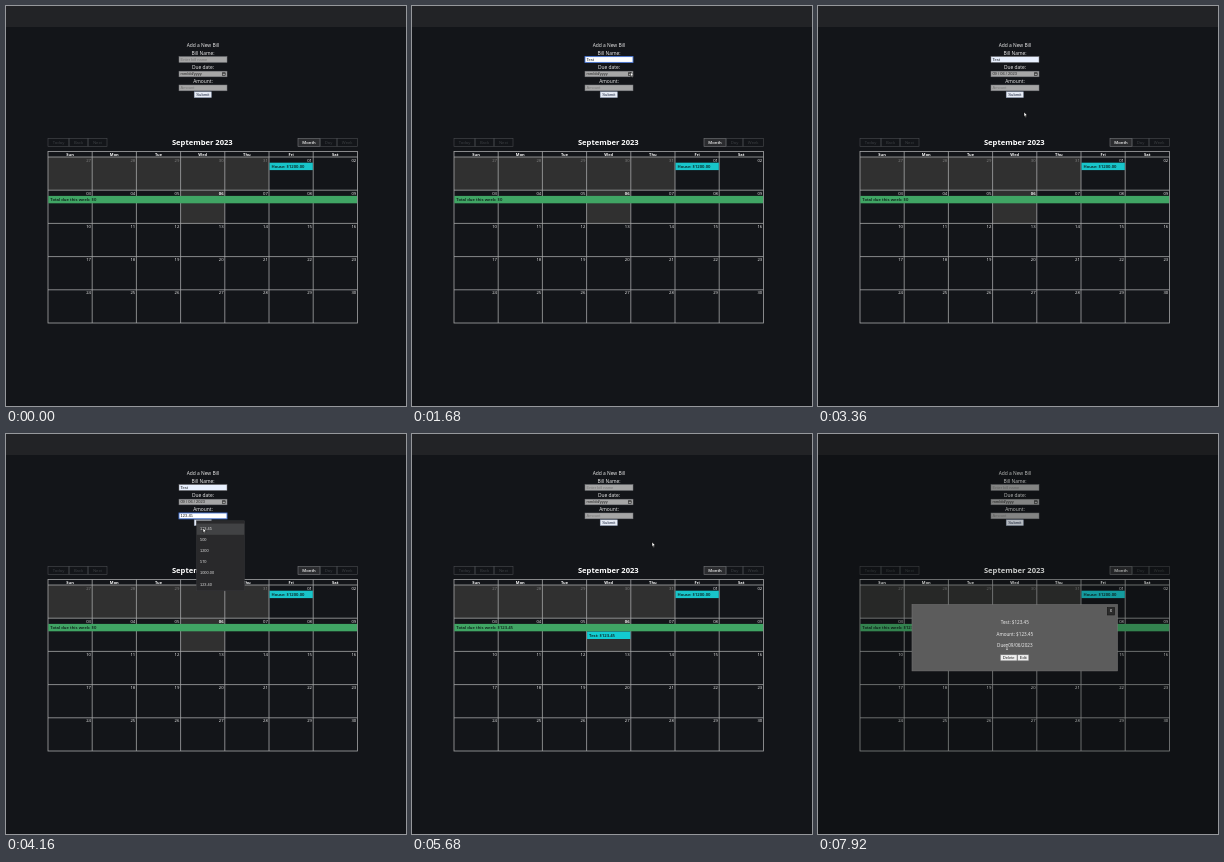
An HTML page with a canvas that plays this animation: 400x400 px, repeating every 8000 ms.

```html
<!DOCTYPE html>
<html lang="en">
<head>
<meta charset="utf-8">
<title>Bill calendar</title>
<style>
html, body { margin: 0; width: 100%; height: 100%; overflow: hidden; background: #131519; }
canvas { display: block; width: 400px; height: 400px; }
</style>
</head>
<body>
<canvas id="stage"></canvas>
<script>
const LOOP = 8000;
const canvas = document.getElementById('stage');
const ctx = canvas.getContext('2d');
const dpr = window.devicePixelRatio || 1;
canvas.width = canvas.height = 400 * dpr;

const UI = '"Open Sans", "Noto Sans", sans-serif';
const ARIAL = '"Liberation Sans", Arial, sans-serif';
const DAYS = ['Sun', 'Mon', 'Tue', 'Wed', 'Thu', 'Fri', 'Sat'];
const NAMES = ['Test', 'Test2', 'Prep', 'House', 'Test3', 'Car'];
const AMOUNTS = ['123.45', '500', '1200', '570', '1000.00', '123.40'];

const GRID = { x: 42, y: 151, w: 44.2, h: 33.2 };
const colX = c => GRID.x + c * GRID.w;
const rowY = r => GRID.y + r * GRID.h;

// When each interaction happens, in ms
const T = {
  nameFocus: 160, nameList: 240, nameHover: 640, namePick: 960,
  pickerOpen: 1840, datePick: 3200, pickerClose: 3360,
  amountFocus: 3680, amountList: 3840, amountHover: 4080, amountPick: 4320,
  submit: 5040, modal: 7560
};

// Cursor path: time, x, y
const PATH = [
  [80, 203, 54], [320, 203, 54], [640, 202, 64], [960, 202, 64],
  [1520, 218.5, 66], [2400, 218.5, 66], [3040, 206, 106], [3360, 206, 106],
  [3600, 188, 82], [3800, 188, 82], [4080, 197, 94], [4320, 197, 94],
  [4720, 197, 88], [5440, 197, 88], [5680, 240, 108], [5880, 240, 108],
  [6400, 190, 200], [6680, 190, 200], [6880, 185, 202], [7520, 185, 202],
  [7840, 189, 213], [8000, 189, 213]
];

const clamp = v => Math.max(0, Math.min(1, v));
const ease = p => p * p * (3 - 2 * p);
const within = (t, a, b) => t >= a && t < b;

function rect(x, y, w, h, fill, stroke, line = 0.7) {
  if (fill) {
    ctx.fillStyle = fill;
    ctx.fillRect(x, y, w, h);
  }
  if (stroke) {
    ctx.strokeStyle = stroke;
    ctx.lineWidth = line;
    ctx.strokeRect(x, y, w, h);
  }
}

function text(str, x, y, size, fill, { align = 'left', weight = 400, font = UI } = {}) {
  ctx.font = `${weight} ${size}px ${font}`;
  ctx.textAlign = align;
  ctx.textBaseline = 'middle';
  ctx.fillStyle = fill;
  ctx.fillText(str, x, y);
}

function line(x1, y1, x2, y2, color, width = 0.8) {
  ctx.strokeStyle = color;
  ctx.lineWidth = width;
  ctx.beginPath();
  ctx.moveTo(x1, y1);
  ctx.lineTo(x2, y2);
  ctx.stroke();
}

function field(y, value, hint, focused, filled) {
  const bg = focused ? '#ffffff' : filled ? '#e8f0fe' : '#a6a6a6';
  rect(173, y, 48, 5.8, bg, focused ? '#4a78d8' : '#77797c', focused ? 0.9 : 0.5);
  text(value || hint, 174.6, y + 3.1, 4, value ? '#15171c' : '#777777', { font: ARIAL });
}

function dateField(t) {
  const open = within(t, T.pickerOpen, T.pickerClose);
  const set = within(t, T.datePick, T.submit);
  rect(173, 65.2, 48, 5.6, '#a6a6a6', open ? '#d6e0f5' : '#77797c', open ? 0.9 : 0.5);
  if (open) rect(173.8, 65.9, 6.4, 4.2, '#2f78d4');
  text(set ? '09 / 06 / 2023' : 'mm/dd/yyyy', 174.4, 68.2, 4, '#222222', { font: ARIAL });
  rect(216.6, 66.8, 2.6, 2.5, null, '#222222', 0.6);
  line(216.6, 67.2, 219.2, 67.2, '#222222', 0.8);
}

function form(t) {
  const label = (s, y) => text(s, 197, y, 4.9, '#f2f2f2', { align: 'center' });
  label('Add a New Bill', 40);
  label('Bill Name:', 47.3);
  label('Due date:', 61.4);
  label('Amount:', 75.8);
  const named = within(t, T.nameHover, T.submit);
  const paid = within(t, T.amountHover, T.submit);
  field(50.6, named && 'Test', 'Enter bill name', within(t, T.nameFocus, T.pickerOpen), named);
  dateField(t);
  field(79, paid && '123.45', 'Amount', within(t, T.amountFocus, T.submit), paid);
  rect(188.2, 85.8, 17.2, 5.8, '#e8edf6', '#8e9bb5', 0.5);
  text('Submit', 196.8, 88.8, 4.2, '#17203a', { align: 'center', font: ARIAL });
}

function buttons(x, widths, names, active) {
  names.forEach((name, i) => {
    const on = i === active;
    rect(x, 132.6, widths[i], 8, on ? '#2b2c2f' : null, on ? '#77797c' : '#494b4f', 0.6);
    text(name, x + widths[i] / 2, 136.8, 4.2, on ? '#f0f0f0' : '#3d4044',
      { align: 'center', weight: on ? 600 : 400 });
    x += widths[i];
  });
}

function event(x, y, w, label, fill) {
  rect(x, y, w, 7.4, fill);
  text(label, x + 2, y + 3.9, 4.2, '#0a1414', { weight: 600 });
}

function calendar(t) {
  const edge = '#a5a6a7';
  const right = colX(7), bottom = rowY(5);
  buttons(42, [21, 19, 19], ['Today', 'Back', 'Next'], -1);
  buttons(292, [22, 17, 20.4], ['Month', 'Day', 'Week'], 0);
  text('September 2023', 196.3, 137, 7.6, '#ffffff', { align: 'center', weight: 700 });

  rect(42, rowY(0), GRID.w * 5, GRID.h, '#303030');
  rect(colX(3), rowY(1), GRID.w, GRID.h, '#303030');
  rect(42, 145.5, right - 42, bottom - 145.5, null, edge, 0.8);
  for (let r = 0; r < 5; r++) line(42, rowY(r), right, rowY(r), edge);
  for (let c = 1; c < 7; c++) line(colX(c), 145.5, colX(c), bottom, edge);

  DAYS.forEach((d, c) => text(d, colX(c) + GRID.w / 2, 148.5, 4, '#ffffff',
    { align: 'center', weight: 700 }));
  for (let i = 0; i < 35; i++) {
    const off = i < 5;
    const day = off ? 27 + i : i - 4;
    text(String(day).padStart(2, '0'), colX(i % 7 + 1) - 1.2, rowY(Math.floor(i / 7)) + 3.5,
      4.2, off ? '#858585' : '#f4f4f4', { align: 'right', weight: i === 10 ? 700 : 400 });
  }

  const added = t >= T.submit;
  event(colX(5) + 0.5, 156.7, GRID.w - 0.9, 'House: $1200.00', '#18c5ca');
  event(42.3, 189.9, right - 42.6, 'Total due this week: $' + (added ? '123.45' : '0'), '#40a564');
  if (added) event(colX(3) + 0.5, 197.6, GRID.w - 0.9, 'Test: $123.45', '#12cbd1');
}

function suggestions(y, items, hover) {
  rect(190.5, y, 48, 70, '#29292b', '#36373a', 0.5);
  if (hover) rect(190.8, y + 2.8, 47.4, 11.2, '#414244');
  items.forEach((s, i) => text(s, 194, y + 8 + i * 11.15, 3.9, '#e2e2e2', { font: ARIAL }));
}

function arrow(x, y, dir) {
  line(x, y - 2.6, x, y + 2.6, '#444444', 0.7);
  for (const s of [-1, 1]) line(x, y + dir * 2.6, x + s * 2.2, y + dir * 0.4, '#444444', 0.7);
}

function picker() {
  rect(173.3, 71.2, 66.4, 86, '#ffffff', '#b5b8bd', 0.5);
  text('September 2023', 176.6, 77.6, 3.9, '#222222', { weight: 700, font: ARIAL });
  ctx.fillStyle = '#222222';
  ctx.beginPath();
  ctx.moveTo(205.7, 76.9);
  ctx.lineTo(208.3, 76.9);
  ctx.lineTo(207, 78.6);
  ctx.fill();
  arrow(222, 77.8, -1);
  arrow(232.3, 77.8, 1);
  const px = c => 180.2 + c * 8.72;
  DAYS.forEach((d, c) => text(d.slice(0, 2), px(c), 89.2, 3.8, '#222222',
    { align: 'center', font: ARIAL }));
  rect(202, 102, 8.9, 8.9, '#1967d2', '#0b3f91', 0.6);
  for (let i = 0; i < 42; i++) {
    const n = i - 4;
    const day = n < 1 ? n + 31 : n > 30 ? n - 30 : n;
    const color = n === 6 ? '#ffffff' : n === day ? '#222222' : '#8a8a8a';
    text(day, px(i % 7), 98 + Math.floor(i / 7) * 8.62, 3.8, color,
      { align: 'center', font: ARIAL });
  }
  text('Clear', 179.3, 150.8, 3.8, '#1967d2', { font: ARIAL });
  text('Today', 233.6, 150.8, 3.8, '#1967d2', { align: 'right', font: ARIAL });
}

function modal(t) {
  const p = clamp((t - T.modal) / 240);
  if (!p) return;
  ctx.globalAlpha = p;
  rect(0, 0, 400, 400, 'rgba(8,9,6,0.22)');
  rect(94, 170.6, 205.4, 66.3, '#5c5c5c', '#747474', 0.6);
  rect(289.3, 173.6, 7.3, 7.4, '#2b2b2b', '#161616', 0.6);
  text('x', 293, 177.1, 4.4, '#f4f4f4', { align: 'center' });
  ['Test: $123.45', 'Amount: $123.45', 'Due: 09/06/2023'].forEach((s, i) =>
    text(s, 196.8, 189.2 + i * 11.5, 4.6, '#f4f4f4', { align: 'center' }));
  rect(182.4, 220.8, 16.6, 6, '#eeeeee', '#777777', 0.5);
  rect(199.6, 220.8, 11.2, 6, '#eeeeee', '#777777', 0.5);
  text('Delete', 190.7, 223.9, 4.1, '#222222', { align: 'center', font: ARIAL });
  text('Edit', 205.2, 223.9, 4.1, '#222222', { align: 'center', font: ARIAL });
  ctx.globalAlpha = 1;
}

function shape(points, scale) {
  ctx.beginPath();
  for (let i = 0; i < points.length; i += 2) ctx.lineTo(points[i] * scale, points[i + 1] * scale);
  ctx.closePath();
  ctx.fillStyle = '#ffffff';
  ctx.strokeStyle = '#000000';
  ctx.lineWidth = 0.5;
  ctx.fill();
  ctx.stroke();
}

function cursor(t) {
  if (t < PATH[0][0]) return;
  let i = 0;
  while (i < PATH.length - 2 && t >= PATH[i + 1][0]) i++;
  const [t0, x0, y0] = PATH[i], [t1, x1, y1] = PATH[i + 1];
  const p = ease(clamp((t - t0) / (t1 - t0)));
  const x = x0 + (x1 - x0) * p, y = y0 + (y1 - y0) * p;

  if (within(t, T.pickerOpen, 2400)) {
    ctx.fillStyle = 'rgba(190,190,190,0.5)';
    ctx.beginPath();
    ctx.arc(x + 1, y + 2, 5.4, 0, 7);
    ctx.fill();
  }
  ctx.save();
  ctx.translate(x, y);
  const beam = within(t, 80, 360) || within(t, 3560, 3840) || within(t, 7760, LOOP);
  if (beam) {
    const c = t > T.modal ? '#e8e8e8' : '#222222';
    line(0, -2.5, 0, 2.5, c, 0.6);
    line(-1, -2.5, 1, -2.5, c, 0.5);
    line(-1, 2.5, 1, 2.5, c, 0.5);
  } else if (within(t, 6360, 7600)) {
    shape([-1, 0, 1, 0, 1, 4, 5, 5, 6, 6, 5, 11, -1, 11, -4, 7, -3, 6, -1, 7], 0.7);
  } else {
    shape([0, 0, 0, 9, 2, 7.2, 3.4, 10.4, 4.8, 9.8, 3.4, 6.6, 6.2, 6.4], 0.52);
  }
  ctx.restore();
}

function draw(t) {
  ctx.setTransform(dpr, 0, 0, dpr, 0, 0);
  rect(0, 0, 400, 400, '#131519');
  rect(0, 0, 400, 21, '#222326');
  form(t);
  calendar(t);
  if (within(t, T.nameList, T.namePick)) suggestions(58, NAMES, t >= T.nameHover - 80);
  if (within(t, T.pickerOpen, T.pickerClose)) picker();
  if (within(t, T.amountList, T.amountPick)) suggestions(86.8, AMOUNTS, t >= T.amountHover - 80);
  modal(t);
  cursor(t);
}

const start = performance.now();
function frame() {
  draw((performance.now() - start) % LOOP);
  requestAnimationFrame(frame);
}
frame();
</script>
</body>
</html>
```
